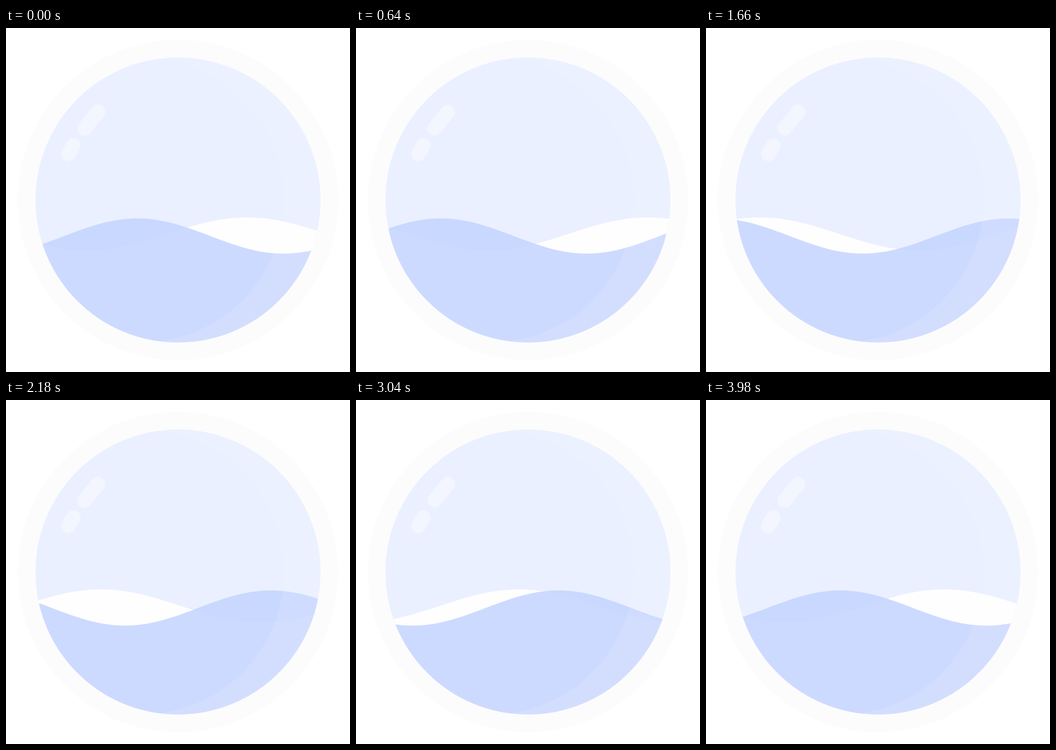
An HTML page for the animation above (4000 ms loop, 700 by 700 pixels).

```html
<!DOCTYPE html>
<html lang="en">
<head>
<meta charset="utf-8">
<title>Water globe</title>
<style>
  html, body { margin: 0; width: 100%; height: 100%; overflow: hidden; background: #fff; }
  svg { display: block; width: 100%; height: 100%; }
  .wave { animation: drift 4s linear infinite; }
  @keyframes drift { to { transform: translateX(var(--shift)); } }
  #back { --shift: 646.8px; fill: #fefefe; }
  #front { --shift: -591px; fill: rgba(194, 210, 255, .82); }
  .shine { stroke: #f3f6ff; stroke-width: 29.6; stroke-linecap: round; }
</style>
</head>
<body>
<svg viewBox="0 0 700 700">
  <defs>
    <clipPath id="globe"><circle cx="350" cy="350" r="290"/></clipPath>
  </defs>
  <circle cx="350" cy="350" r="326" fill="#fcfcfc"/>
  <circle cx="350" cy="350" r="290" fill="#eaf0ff"/>
  <g clip-path="url(#globe)">
    <path id="back" class="wave"/>
    <path id="front" class="wave"/>
    <!-- lighter crescent: everything outside the shifted disc -->
    <path fill="#fff" fill-opacity=".12" fill-rule="evenodd"
      d="M0 0H700V700H0Z M-14.5 350a290 290 0 0 1 580 0a290 290 0 0 1 -580 0Z"/>
  </g>
  <path class="shine" d="M187 171L160 204.3M137 239L127 256.3"/>
</svg>
<script>
  // Sine surface with a crest at the given x, filled down to the floor.
  function wavePath(crest, length, middle, height) {
    let d = "M-720 720";
    for (let x = -720; x <= 1320; x += 4) {
      const y = middle - height * Math.cos(2 * Math.PI * (x - crest) / length);
      d += `L${x} ${y.toFixed(2)}`;
    }
    return d + "V720Z";
  }

  const setWave = (id, ...shape) =>
    document.getElementById(id).setAttribute("d", wavePath(...shape));

  setWave("back", 490.5, 650, 419.2, 33.8);
  setWave("front", 267.3, 594, 423.3, 35.8);
</script>
</body>
</html>
```
